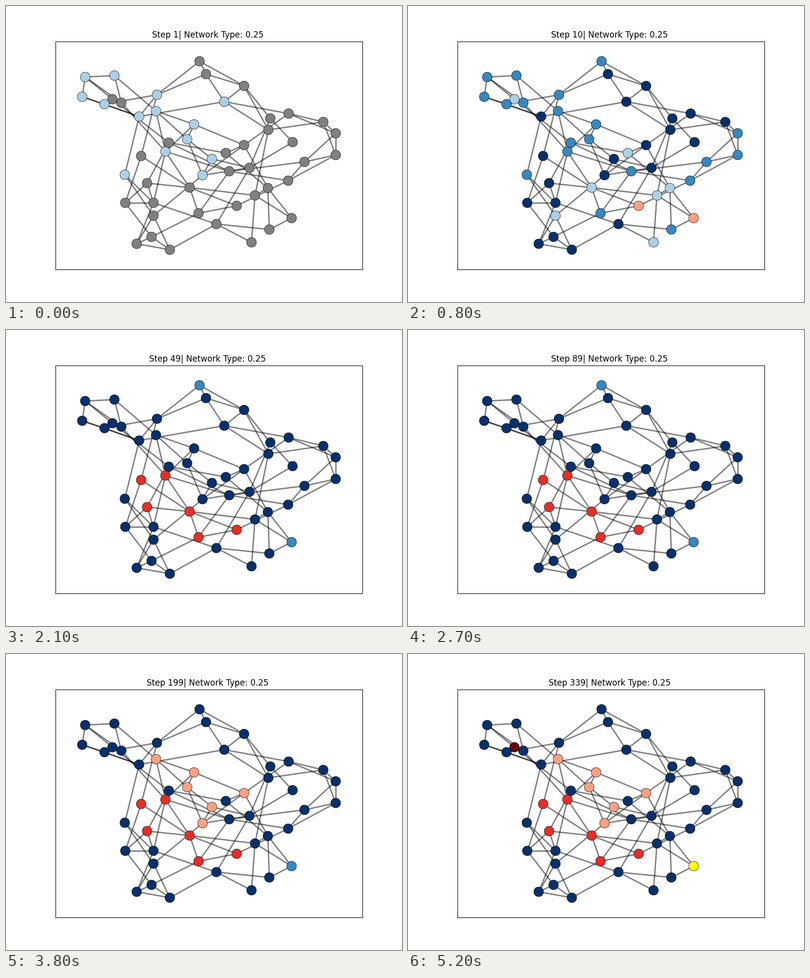
Recreate the animation shown at these times as a matplotlib script. Size 800 by 600 pixels, loop 5300 ms.

```python
import numpy as np
import matplotlib.pyplot as plt
from matplotlib.animation import FuncAnimation
from matplotlib.collections import LineCollection

FRAMES, INTERVAL = 53, 100

# Node centres in pixels, in order around the small-world ring.
POS = np.array([
    (305, 180), (391, 112), (404, 138), (481, 162), (441, 194), (530, 251),
    (571, 218), (641, 235), (666, 258), (666, 302), (603, 316), (570, 354),
    (451, 335), (466, 405), (389, 420), (371, 368), (273, 304), (285, 359),
    (241, 399), (298, 399), (240, 342), (298, 425), (264, 482), (331, 494),
    (294, 468), (425, 442), (496, 479), (532, 453), (577, 430), (529, 369),
    (503, 384), (444, 298), (481, 282), (397, 343), (416, 310), (366, 270),
    (380, 240), (303, 213), (322, 295), (219, 141), (160, 144), (233, 196),
    (215, 189), (329, 277), (534, 228), (579, 276), (492, 328), (154, 184),
    (199, 199), (269, 224),
])
N = len(POS)

# A node links to the next two on the ring unless it was rewired here.
REWIRED = {
    5: (7, 30), 12: (14, 38), 14: (15, 24), 16: (18, 0), 18: (19, 24),
    19: (20, 22, 25), 20: (21, 49), 24: (), 26: (30,), 30: (15,),
    31: (32, 43), 32: (33, 29, 36, 6), 33: (34, 35, 21), 34: (35, 46),
    38: (19, 41, 15), 41: (), 42: (43,), 43: (12, 17), 44: (45, 46, 3),
    45: (46,), 46: (33, 25), 47: (48, 49, 40), 49: (0, 4),
}
LINKS = [(i, j) for i in range(N)
         for j in REWIRED.get(i, ((i + 1) % N, (i + 2) % N))]

BLUES, REDS = plt.get_cmap("Blues"), plt.get_cmap("Reds")
COLORS = {0: "gray", 4: "yellow"}
for k in (1, 2, 3):
    COLORS[k] = BLUES(k / 3)
    COLORS[-k] = REDS(k / 3)


def paint(base, groups):
    """Copy the opinions in base and set stretches of the ring."""
    out = base.copy()
    for level, nodes in groups.items():
        out[nodes] = level
    return out


ring = np.r_
neutral, agreed = np.zeros(N, int), np.full(N, 3)
start = paint(neutral, {1: ring[33:41, 47:50, 0, 4, 20]})
spread = paint(agreed, {2: ring[0:2, 8:13, 14, 20, 27, 35:42, 43, 47:49],
                        1: ring[15, 21, 26, 29:32, 42],
                        -1: ring[13, 28]})
split = paint(agreed, {2: ring[1, 8:13, 27:30, 31:33],
                       1: 26,
                       -2: ring[11, 13:18, 30, 38]})
filled = np.where(split == 3, 3, spread)
shrunk = paint(split, {3: ring[8:13, 29:33]})
calm = paint(shrunk, {3: ring[26:28]})
cluster = paint(calm, {3: 1, -1: ring[32:38]})
final = paint(cluster, {-3: 42, 4: 28})

# Opinions drift between these moments, or jump where they are one apart.
KEYS = [(0, start), (6, spread), (8, spread), (12, filled), (13, filled),
        (14, split), (16, split), (17, shrunk), (18, shrunk), (20, calm),
        (27, calm), (28, cluster), (51, cluster), (52, final)]


def opinions(n):
    for (a, p), (b, q) in zip(KEYS, KEYS[1:]):
        if n <= b:
            return np.rint(p + (q - p) * (n - a) / (b - a)).astype(int)
    return final


def step(n):
    s = np.interp(n, [0, 8, 15, 16, 25, 52], [1, 10, 20, 24, 69, 339])
    return int(s + 1e-6)


fig, ax = plt.subplots(figsize=(8, 6), dpi=100)
ax.set(xlim=(100, 720), ylim=(534, 72), xticks=[], yticks=[])
ax.add_collection(LineCollection([POS[[i, j]] for i, j in LINKS],
                                 colors="black", linewidths=2, alpha=0.5,
                                 zorder=1), autolim=False)
nodes = ax.scatter(*POS.T, s=200, edgecolors="black", linewidths=0.5, zorder=2)
title = ax.set_title("")


def update(n):
    nodes.set_facecolor([COLORS[v] for v in opinions(n)])
    # The trailing space takes part in the centring.
    title.set_text(f"Step {step(n)}| Network Type: 0.25 ")
    return nodes, title


anim = FuncAnimation(fig, update, frames=FRAMES, interval=INTERVAL,
                     repeat=True, repeat_delay=0)
plt.show()
```
